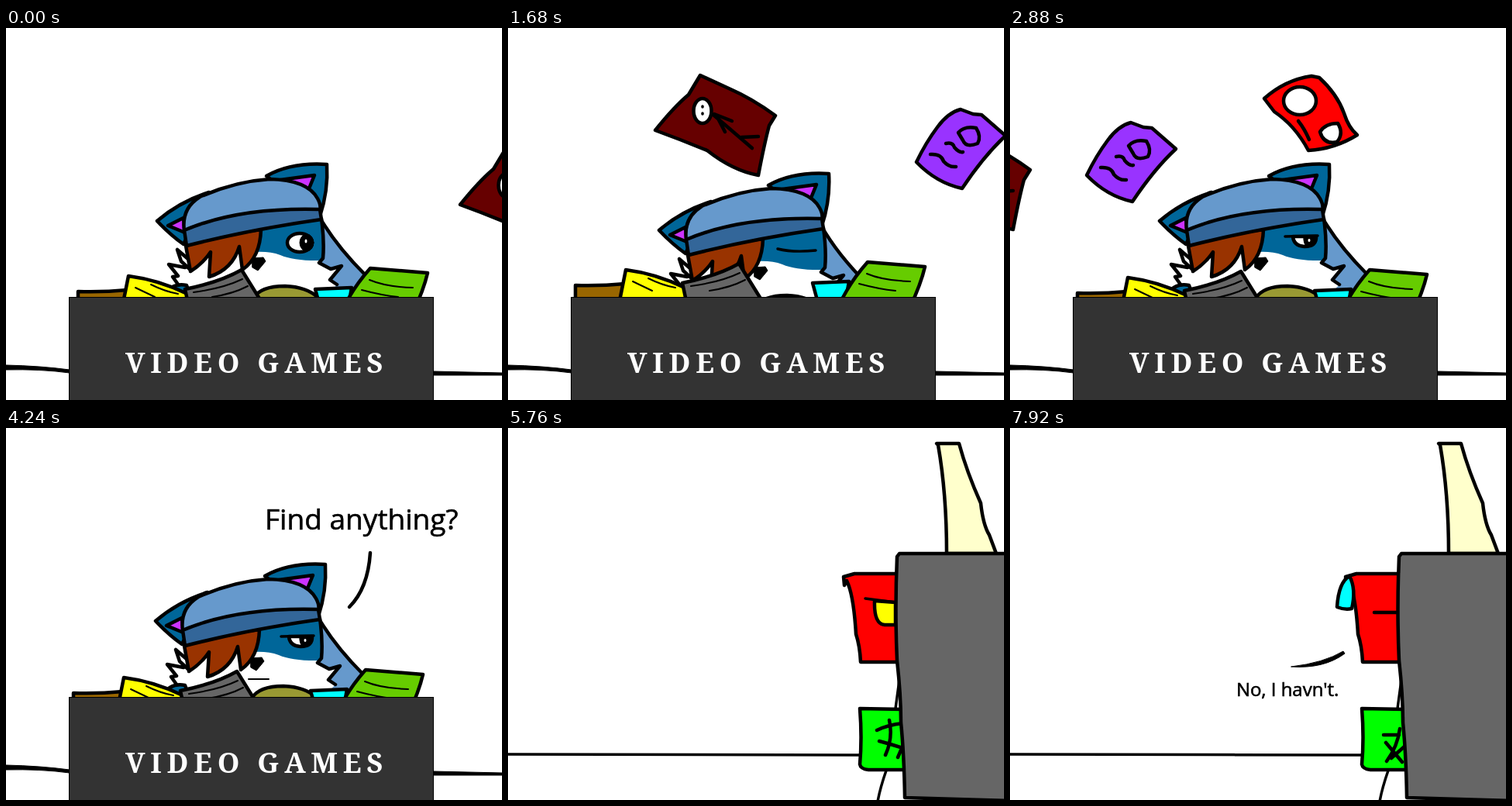
An HTML page that plays this animation: 640x480 px, repeating every 8000 ms.

```html
<!DOCTYPE html>
<html lang="en">
<head>
<meta charset="utf-8">
<title>Video games</title>
<style>
html, body { margin: 0; height: 100%; overflow: hidden; background: #fff; }
svg { display: block; width: 640px; height: 480px; }
path, ellipse { stroke: #000; stroke-width: 4.5; stroke-linejoin: round; stroke-linecap: round; }
.line, .pen, .thin { fill: none; }
.pen { stroke-width: 3.5; }
.thin { stroke-width: 2; }
.solid { stroke-width: 1; }
.flat { stroke: none; }
.say { font-family: "Open Sans", sans-serif; stroke: #000; stroke-width: .6; }
.title { font: bold 36.5px "Noto Serif", serif; letter-spacing: 6.7px; fill: #fff; }
</style>
</head>
<body>
<svg viewBox="0 0 640 480">
  <g id="shop">
    <path class="solid" d="M0 435Q45 436 82 441V445Q45 440 0 441Z"/>
    <path class="solid" d="M551 443L640 445V448L551 448Z"/>

    <g id="cat">
      <path fill="#69c" d="M404 243Q425 280 463 318L440 360H395Z"/>
      <path fill="#069" d="M229 279Q212 267 195 249Q224 224 262 212Z"/>
      <path fill="#c3f" d="M209 255L229 245L231 264Z"/>
      <path fill="#069" d="M336 191Q368 173 414 176Q416 210 405 243Z"/>
      <path fill="#c3f" d="M354 196L398 190L389 212Z"/>
      <path class="flat" fill="#fff" d="M233 275L408 245L409 297L405 303L419 311L433 307L418 325L427 331L400 360H225V335L215 321L222 320L210 305L233 308L221 286L236 299Z"/>
      <path class="flat" fill="#069" d="M322 262L408 245L409 300Q372 301 354 293Q340 288 322 289Z"/>
      <path class="line" d="M407 246Q411 275 409 297L404 303L419 311L433 307L418 325L427 331M236 299L221 286L226 301L238 312M231 309L210 305L222 320L215 321L225 335"/>
      <path fill="#069" d="M203 345Q215 328 233 332L240 350Z"/>
      <path fill="#993" d="M319 349Q328 333 360 333Q388 334 403 348V360H319Z"/>
      <path fill="#930" d="M232 281L238 314Q254 304 264 289L262 321Q292 312 301 282L305 312Q328 296 329 260Q280 265 232 281Z"/>
      <path fill="#69c" d="M230 262Q226 233 250 218Q295 198 340 195Q389 196 402 220Q407 229 405 236Q300 237 230 262Z"/>
      <path fill="#369" d="M230 261Q300 231 405 234L407 247Q315 260 233 281Z"/>
      <path class="solid" d="M318 297L332 296L335 301L325 313L318 309Z"/>
      <g id="eyeOpen">
        <ellipse cx="379" cy="277" rx="16" ry="12" fill="#fff"/>
        <ellipse class="solid" cx="388" cy="277" rx="9" ry="11"/>
        <ellipse class="flat" cx="387" cy="275" rx="1.5" ry="2.5" fill="#fff"/>
      </g>
      <path id="eyeShut" class="pen" d="M348 273Q368 278 397 275"/>
      <g id="eyeHalf">
        <path fill="#fff" d="M367 269H397Q398 282 382 282Q368 281 367 269Z"/>
        <path class="solid" d="M381 269H398Q398 283 385 283Q380 277 381 269Z"/>
        <path class="pen" d="M357 269L399 268"/>
        <ellipse class="flat" cx="388" cy="274" rx="1.5" ry="2" fill="#fff"/>
      </g>
      <path id="lips" class="thin" d="M315 324H341"/>
      <ellipse id="gape" class="solid" cx="326" cy="326" rx="15" ry="5.5"/>
    </g>

    <g id="pile">
      <path fill="#960" d="M93 370V340Q125 341 157 338L150 370Z"/>
      <path fill="#ff0" d="M148 370L158 320Q197 325 234 343L238 370Z"/>
      <path class="thin" d="M167 335L192 347M187 331Q205 340 222 343"/>
      <path fill="#0ff" d="M408 370L399 337L446 335L440 370Z"/>
      <path fill="#666" d="M238 370L231 337Q276 328 304 312L340 370Z"/>
      <path class="thin" d="M242 341Q280 336 305 324M266 347Q293 343 312 333"/>
      <path fill="#6c0" d="M430 370L443 347Q454 328 470 310L544 316Q539 338 524 370Z"/>
      <path class="thin" d="M469 325Q490 334 525 335M459 338Q485 345 506 347"/>
    </g>

    <rect x="81.5" y="347.5" width="470" height="140" fill="#333" stroke="#000"/>
    <text class="title" x="154" y="445">VIDEO GAMES</text>

    <g id="maroon">
      <path fill="#600" d="M83 101L120 118Q150 131 180 153L172 166Q166 188 158 230Q125 224 92 198Q58 184 25 172Q49 142 68 126Z"/>
      <ellipse cx="86" cy="147" rx="11.5" ry="16" fill="#fff"/>
      <path class="pen" d="M86 141V142M86 150V151"/>
      <path class="line" d="M100 152L150 195M101 151L124 160M104 153L115 174M136 181L158 180"/>
    </g>
    <g id="violet">
      <path fill="#93f" d="M303 150Q315 125 330 105Q344 86 360 82L376 88L387 89L418 116Q390 142 362 184Q329 177 303 150Z"/>
      <path class="line" d="M357 112Q365 103 380 106Q387 117 382 126Q367 132 363 122ZM341 126Q350 124 352 131Q358 138 363 137M321 140Q335 139 338 149Q345 157 354 156"/>
    </g>
    <g id="scarlet">
      <path fill="#f00" d="M517 49Q544 25 578 20L588 22Q611 43 620 68Q626 87 637 96Q608 114 574 116Q557 84 530 66Z"/>
      <ellipse cx="563" cy="52" rx="21" ry="18" fill="#fff"/>
      <path fill="#fff" d="M589 92Q596 81 612 81Q620 94 611 105Q594 109 589 92Z"/>
      <path class="line" d="M561 78Q569 88 575 102"/>
    </g>

    <g id="ask">
      <text class="say" x="334" y="131" font-size="37">Find anything?</text>
      <path class="line" d="M470 161Q467 207 443 231"/>
    </g>
  </g>

  <g id="shelf">
    <path class="pen" d="M0 421L455 422"/>
    <path class="pen" d="M505 325L500 362M488 442Q480 465 477 482"/>
    <path fill="#ffc" d="M553 20H582Q592 57 610 97Q613 125 621 138L630 162H566Q566 85 555 22Z"/>
    <path fill="#f00" d="M434 203L433 192L447 188H505V302H455Q454 281 449 266Q446 215 437 197Z"/>
    <g id="glare">
      <path fill="#ff0" d="M473 223L500 225V254H486Q472 253 473 223Z"/>
      <path class="pen" d="M461 220L500 225"/>
    </g>
    <path id="blink" class="line" d="M470 238H500"/>
    <path id="ear" fill="#0ff" d="M438 191Q424 199 422 231Q432 235 441 233Q447 208 438 191Z"/>
    <path fill="#0f0" d="M454 362L512 363V441H465Q455 440 454 434Q457 400 454 362Z"/>
    <path id="mouthA" class="line" d="M476 390Q490 383 510 381M479 404Q494 408 510 413M492 377Q497 400 487 422M503 425L509 411"/>
    <path id="mouthB" class="line" d="M482 396H502M503 388Q500 411 486 430M485 406L506 431M492 426L510 410"/>
    <path fill="#666" d="M505 162H646V481L512 477Q511 420 507 380Q507 345 502 300Q499 235 502 166Z"/>
    <g id="reply">
      <path class="solid" d="M363 308Q405 303 430 288L432 291Q405 311 363 308Z"/>
      <text class="say" x="292" y="346" font-size="24">No, I havn't.</text>
    </g>
  </g>
</svg>
<script>
const $ = id => document.getElementById(id);
const show = (id, on) => $(id).style.display = on ? '' : 'none';

// Held poses: [start ms, dx, dy]; a pose without an offset hides the part.
const tracks = {
  maroon: [[0, 561, 56], [400, 468, 0], [1200, 316, -56], [1680, 165, -40], [2160, 0, 0], [2640, -154, 30], [3120]],
  violet: [[0], [1680, 224, 23], [2160, 0, 0], [2640, -204, 40], [3120, -364, 71], [3440]],
  scarlet: [[0], [2160, 0, 0], [2640, -189, 42], [3120, -392, 75], [3440, -513, 96], [3840]],
  cat: [[0, 0, 0], [1040, 0, 12], [2800, -1, 6], [2880, -2, 0]],
  pile: [[0, 0, 0], [1200, -6, -8], [2800, -6, -3], [2880, -6, 2]]
};
const held = (poses, t) => poses.filter(p => p[0] <= t).pop();

function draw(now) {
  const t = now % 8000, inShop = t < 5760;
  show('shop', inShop);
  show('shelf', !inShop);

  if (inShop) {
    for (const id in tracks) {
      const [, x, y] = held(tracks[id], t);
      show(id, x !== undefined);
      if (x !== undefined) $(id).setAttribute('transform', `translate(${x} ${y})`);
    }
    const talking = t >= 4240, gaping = talking && Math.floor((t - 4240) / 320) % 2 === 1;
    show('eyeOpen', t < 1040);
    show('eyeShut', t >= 1040 && t < 2880);
    show('eyeHalf', t >= 2880);
    show('lips', talking && !gaping);
    show('gape', gaping);
    show('ask', talking);
  } else {
    const shut = t >= 6400 && t < 6560 || t >= 7600;
    const first = Math.floor((t - 5760) / 240) % 2 === 0;
    show('glare', !shut);
    show('blink', shut);
    show('mouthA', first);
    show('mouthB', !first);
    show('reply', t >= 6400);
    show('ear', t >= 7680);
    const turn = t < 7760 ? 45 : t < 7840 ? 90 : t < 7920 ? 45 : 0;
    $('ear').setAttribute('transform', `rotate(${turn} 440 191)`);
  }
}

const start = performance.now();
function tick() {
  draw(performance.now() - start);
  requestAnimationFrame(tick);
}
tick();
</script>
</body>
</html>
```
